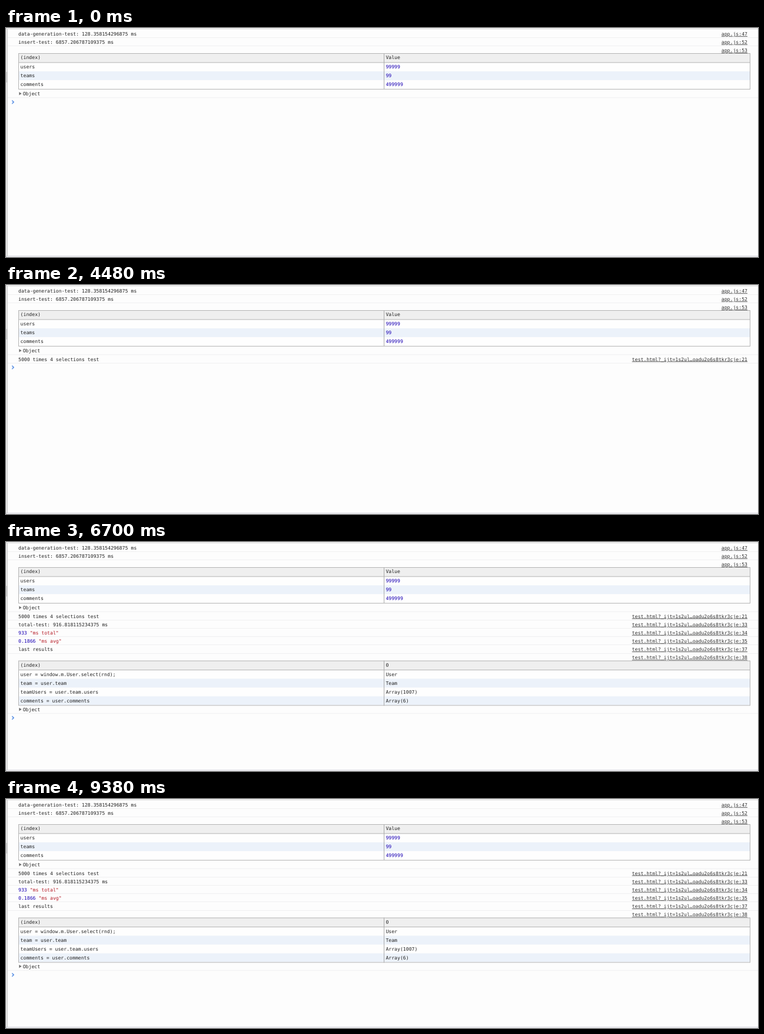
Animation, 1280 px wide and 391 px high, one loop 9400 ms. Source, as an HTML page:

```html
<!DOCTYPE html>
<html lang="en">
<head>
<meta charset="utf-8">
<title>Console</title>
<style>
html, body { margin: 0; width: 100%; height: 100%; overflow: hidden; background: #fdfdfd; }
svg { display: block; width: 1280px; height: 391px; }
text {
  font: 8.17px "DejaVu Sans Mono", monospace;
  fill: #222;
  white-space: pre;
  text-rendering: geometricPrecision;
}
.num { fill: #1a01b4; }
.str { fill: #b41722; }
.link { text-anchor: end; text-decoration: underline; fill: #333; }
</style>
</head>
<body>
<svg id="stage" viewBox="0 0 1280 391" xmlns="http://www.w3.org/2000/svg"></svg>
<script>
const LOOP = 9400, TEST_AT = 2100, RESULT_AT = 4500;
const stage = document.getElementById('stage');

function add(parent, tag, attrs = {}, content = '') {
  const el = document.createElementNS('http://www.w3.org/2000/svg', tag);
  for (const key in attrs) el.setAttribute(key, attrs[key]);
  el.textContent = content;
  parent.append(el);
  return el;
}

const group = () => add(stage, 'g');
const rect = (g, x, y, width, height, fill) => add(g, 'rect', { x, y, width, height, fill });
const rule = (g, y) => rect(g, 3, y, 1277, 1, '#f0f0f1');

// y is the middle of the line of text
const label = (g, x, y, str, cls = '') => add(g, 'text', { x, y: y + 2.9, class: cls }, str);
const link = (g, y, str) => label(g, 1262, y, str, 'link');
const testLink = (g, y, line) => link(g, y, 'test.html?_ijt=1s2ul…oadu2o6s8tkr3cje:' + line);

function table(g, top, head, rows, cls) {
  const height = 17 + rows.length * 15;
  rect(g, 21, top, 1246, height, '#fefefe');
  rect(g, 21, top, 1246, 16, '#efefef');
  rows.forEach((row, i) => {
    if (i % 2) rect(g, 21, top + 16 + i * 15, 1246, 15, '#ecf2fa');
  });
  rect(g, 21, top + 15.5, 1246, 1, '#b4b4b4');
  rect(g, 643, top, 1, height, '#aaa');
  add(g, 'rect', {
    x: 21.5, y: top + .5, width: 1245, height: height - 1, fill: 'none', stroke: '#b4b4b4'
  });
  [head, ...rows].forEach(([key, value], i) => {
    const y = top + 7.5 + (i ? i * 15 + .6 : 0);
    label(g, 24.6, y, key);
    label(g, 646.4, y, value, i ? cls : '');
  });
}

function objectLine(g, y) {
  add(g, 'path', { d: `M22.3 ${y - 2.7}l4.3 2.7l-4.3 2.7z`, fill: '#6e6e6e' });
  label(g, 28.7, y, 'Object');
  rule(g, y + 6.5);
}

// Panel edges
const base = group();
rect(base, 0, 0, 2, 391, '#ececec');
rect(base, 0, 75, 2, 18, '#d0d0d0');
rect(base, 2, 1, 1, 389, '#cbcbcb');
rect(base, 0, 1, 1280, 1, '#d2d2d2');
rect(base, 0, 389, 1280, 1, '#d0d0d8');

// Data generation
label(base, 21, 10, 'data-generation-test: 128.358154296875 ms');
link(base, 10, 'app.js:47');
rule(base, 16);
label(base, 21, 24, 'insert-test: 6857.206787109375 ms');
link(base, 24, 'app.js:52');
rule(base, 30);
link(base, 38.3, 'app.js:53');
table(base, 43, ['(index)', 'Value'],
  [['users', '99999'], ['teams', '99'], ['comments', '499999']], 'num');
objectLine(base, 112);

// Test start
const test = group();
label(test, 21, 126.6, '5000 times 4 selections test');
testLink(test, 126.6, 21);
rule(test, 133);

// Test results
const result = group();
label(result, 21, 140.8, 'total-test: 916.818115234375 ms');
testLink(result, 140.8, 33);
[[154.9, '933', '"ms total"', 34], [169, '0.1866', '"ms avg"', 35]].forEach(([y, num, str, line]) => {
  const row = label(result, 21, y, '');
  add(row, 'tspan', { class: 'num' }, num + ' ');
  add(row, 'tspan', { class: 'str' }, str);
  testLink(result, y, line);
});
label(result, 21, 183.2, 'last results');
testLink(result, 183.2, 37);
[147, 161, 175, 190].forEach(y => rule(result, y));
testLink(result, 197.4, 38);
table(result, 202.5, ['(index)', '0'], [
  ['user = window.m.User.select(rnd);', 'User'],
  ['team = user.team', 'Team'],
  ['teamUsers = user.team.users', 'Array(1007)'],
  ['comments = user.comments', 'Array(6)']
]);
objectLine(result, 285.8);

const prompt = add(stage, 'path', {
  d: 'M10.2 -2.7L13.2 0L10.2 2.7', fill: 'none', stroke: '#3d7de0', 'stroke-width': 1.3
});

// Each step is [time, style], held until the next one
function play(el, steps) {
  const frames = steps.map(([time, style]) => ({ ...style, offset: time / LOOP, easing: 'steps(1, end)' }));
  frames.push({ ...steps[steps.length - 1][1], offset: 1 });
  el.animate(frames, { duration: LOOP, iterations: Infinity });
}

const showAt = (el, time) => play(el, [[0, { opacity: 0 }], [time, { opacity: 1 }]]);
const atY = y => ({ transform: `translateY(${y}px)` });

showAt(test, TEST_AT);
showAt(result, RESULT_AT);
play(prompt, [[0, atY(126.5)], [TEST_AT, atY(140.6)], [RESULT_AT, atY(300.2)]]);
</script>
</body>
</html>
```
